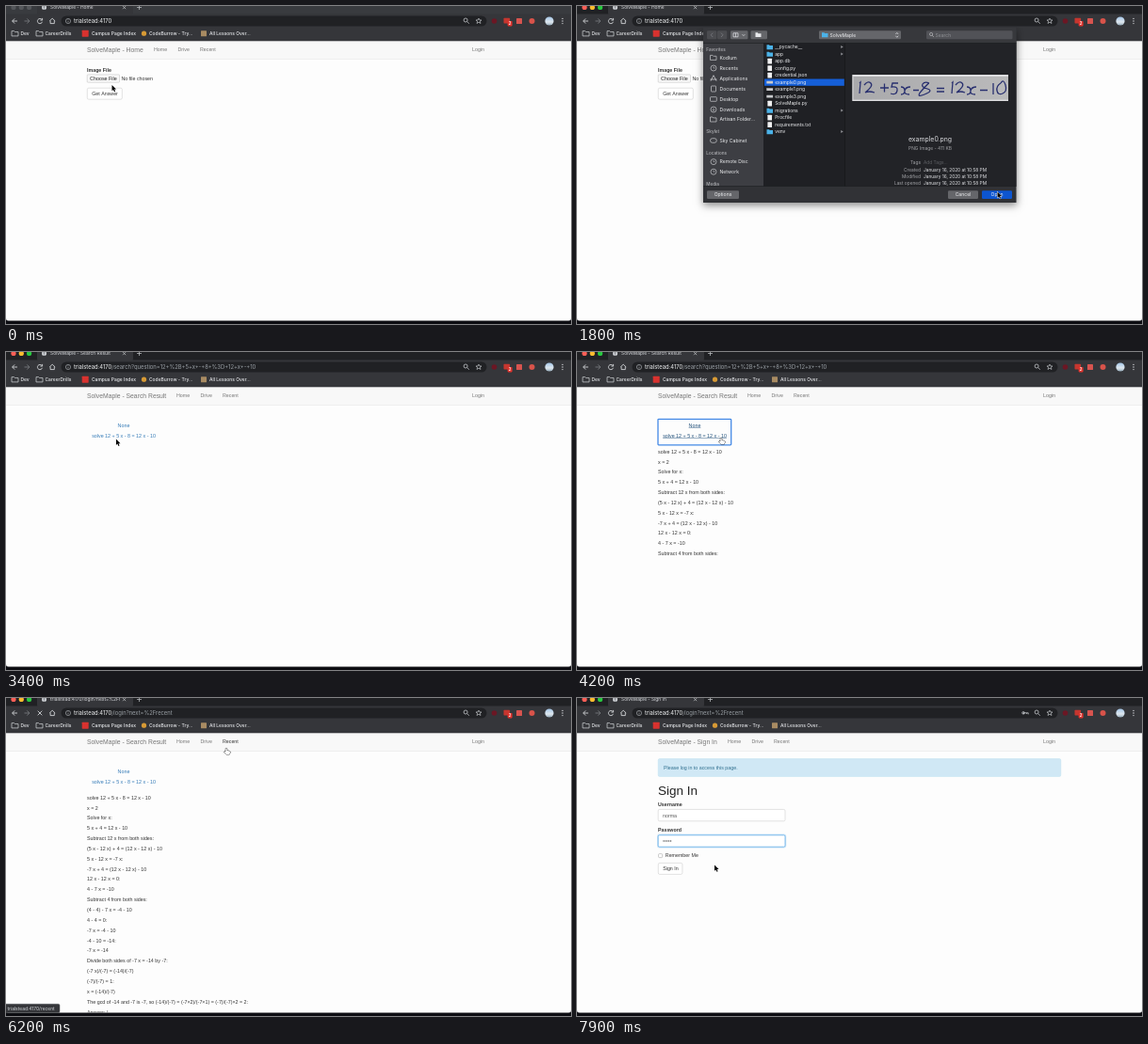
Animation, 600 px wide and 338 px high, one loop 8000 ms. Source, as an HTML page with a canvas:

```html
<!DOCTYPE html>
<html lang="en">
<head>
<meta charset="utf-8">
<title>Equation solver demo</title>
<style>
html, body { margin: 0; width: 100%; height: 100%; overflow: hidden; background: #fff; }
canvas { display: block; width: 600px; height: 338px; }
</style>
</head>
<body>
<canvas id="stage"></canvas>
<script>
const LOOP = 8000, STEP = 100;
const UI = 'Inter, "Open Sans", sans-serif';
const PAGE = '"Liberation Sans", Arial, sans-serif';
const APP = 'SolveMaple', HOST = 'trialstead:4170';
const BODY = 5.3;
const canvas = document.getElementById('stage');
const ctx = canvas.getContext('2d');
const dpr = window.devicePixelRatio || 1;
canvas.width = 600 * dpr;
canvas.height = 338 * dpr;

const clamp = v => Math.max(0, Math.min(1, v));
const smooth = v => { v = clamp(v); return v * v * (3 - 2 * v); };
const ramp = (t, a, b) => smooth((t - a) / (b - a));

// ---- drawing helpers ----
function rect(x, y, w, h, fill) {
  ctx.fillStyle = fill;
  ctx.fillRect(x, y, w, h);
}

function box(x, y, w, h, r, fill, line, width = 0.5) {
  ctx.beginPath();
  ctx.roundRect(x, y, w, h, r);
  if (fill) { ctx.fillStyle = fill; ctx.fill(); }
  if (line) { ctx.strokeStyle = line; ctx.lineWidth = width; ctx.stroke(); }
}

function dot(x, y, r, fill) {
  ctx.beginPath();
  ctx.arc(x, y, r, 0, Math.PI * 2);
  ctx.fillStyle = fill;
  ctx.fill();
}

function stroke(d, color, width = 0.8) {
  ctx.strokeStyle = color;
  ctx.lineWidth = width;
  ctx.stroke(new Path2D(d));
}

// Text with its visual middle at y; returns the width.
function text(s, x, y, size, color, font = UI, weight = 400, align = 'left') {
  ctx.font = `${weight} ${size}px ${font}`;
  ctx.textAlign = align;
  ctx.fillStyle = color;
  ctx.fillText(s, x, y + size * 0.35);
  return ctx.measureText(s).width;
}

const page = (s, x, y, color = '#333', size = BODY, weight = 400, align = 'left') =>
  text(s, x, y, size, color, PAGE, weight, align);

function clipped(x, y, w, h, draw) {
  ctx.save();
  ctx.beginPath();
  ctx.rect(x, y, w, h);
  ctx.clip();
  draw();
  ctx.restore();
}

function folder(x, y, w, h, color, fill) {
  const d = `M${x} ${y}h${w * 0.38}l${w * 0.12} ${h * 0.18}h${w * 0.5}v${h * 0.82}h${-w}z`;
  if (fill) { ctx.fillStyle = color; ctx.fill(new Path2D(d)); }
  else stroke(d, color, 0.7);
}

// ---- timeline ----
const PATH = [
  [0, 112.5, 84], [300, 112.5, 84], [1000, 226, 79], [1200, 226, 79], [1700, 446.5, 197.5],
  [1900, 446.5, 197.5], [2400, 135.5, 109], [2750, 108, 93], [3200, 108, 93],
  [3900, 153, 91], [4200, 153, 91], [4700, 178, 157], [5400, 178, 157],
  [6000, 234, 53], [6500, 234, 53], [6900, 146, 125], [7000, 146, 125], [7900, 146, 177.5]
];

function mouseAt(t) {
  for (let i = 1; i < PATH.length; i++) {
    const [a, ax, ay] = PATH[i - 1], [b, bx, by] = PATH[i];
    if (t <= b) {
      const p = ramp(t, a, b);
      return [ax + (bx - ax) * p, ay + (by - ay) * p];
    }
  }
  return PATH[PATH.length - 1].slice(1);
}

function stateAt(t) {
  const view = t < 3400 ? 'home' : t < 6600 ? 'result' : 'login';
  const title = { home: 'Home', result: 'Search Result', login: 'Sign In' }[view];
  const wait = (t >= 3000 && t < 3400) || (t >= 6100 && t < 6600);
  let path = '';
  if (t >= 3000) path = '/search?question=12+%2B+5+x+-+8+%3D+12+x+-+10';
  if (t >= 6100) path = '/login?next=%2Frecent';
  return {
    t, view, title, wait, path,
    sheet: t < 1000 ? clamp(t / 200) : clamp((2000 - t) / 200),
    scroll: 17 * (ramp(t, 4800, 5100) - ramp(t, 5400, 5800)),
    mouse: mouseAt(t),
    hand: (t >= 3800 && t < 4400) || (t >= 5900 && t < 6600),
    hidden: t >= 7000 && t < 7900
  };
}

// CSS "ease" curve
function ease(p) {
  let lo = 0, hi = 1, u = 0.5;
  for (let i = 0; i < 20; i++) {
    u = (lo + hi) / 2;
    const x = 0.75 * u * (1 - u) * (1 - u) + 0.75 * u * u * (1 - u) + u * u * u;
    if (x < p) lo = u; else hi = u;
  }
  return 0.3 * u * (1 - u) * (1 - u) + 3 * u * u * (1 - u) + u * u * u;
}

// ---- browser window ----
function bookmark(s, x, y = 29.2) { text(s, x, y, 4.95, '#e8eaed', UI, 500); }

function browser(s) {
  const idle = s.t < 100;
  rect(0, 0, 600, 9, idle ? '#393b3f' : '#202124');
  rect(0, 8.5, 600, 28.8, '#35363a');
  box(33, -6, 102, 16, 3, '#35363a');
  ['#ff5f57', '#febc2e', '#28c840'].forEach((c, i) =>
    dot(8 + i * 8.3, 1.5, 2.6, idle ? '#55575b' : c));

  dot(40.5, 1.5, 2.5, '#d5d8dc');
  stroke('M38.3 1h4M40.5 -1v5', '#6a6d72', 0.5);
  clipped(46, 0, 75, 9, () =>
    text(s.wait ? HOST + s.path : `${APP} - ${s.title}`, 47, 1.4, 4.9, '#d8dade'));
  stroke('M124 0l3.2 3.2M127.2 0l-3.2 3.2M139 1.5h5M141.5 -1v5', '#c4c7cb', 0.7);

  stroke('M12 16h-5.2M9.2 13.4l-2.6 2.6l2.6 2.6', '#e4e6e9');
  stroke('M19.5 16h5.2M22.3 13.4l2.6 2.6l-2.6 2.6', '#7c7f83');
  if (s.wait) stroke('M33.7 13.7l4.6 4.6M38.3 13.7l-4.6 4.6', '#e4e6e9');
  else stroke('M38 14.4a2.6 2.6 0 1 0 .5 2.4M38.6 12.9v2.2h-2.2', '#e4e6e9');
  stroke('M46.2 16l3-2.8l3 2.8M47.1 15.6v3h4.2v-3', '#e4e6e9');

  box(58.5, 10.4, 452, 11.2, 5.6, '#202124');
  ctx.beginPath();
  ctx.arc(66, 16, 2.6, 0, 7);
  ctx.strokeStyle = '#b7babf';
  ctx.lineWidth = 0.6;
  ctx.stroke();
  stroke('M66 15.7v1.7M66 14.4v.6', '#b7babf', 0.6);
  const w = text(HOST, 72, 15.9, 5.85, '#f1f3f4');
  if (s.path) text(s.path, 72 + w, 15.9, 5.85, '#9aa0a6');

  if (s.view === 'login') {
    stroke('M475 15.8h4.2v1.6M477.6 16v1', '#c4c7cb', 0.8);
    dot(474, 15.8, 1.6, '#c4c7cb');
    dot(473.7, 15.8, 0.6, '#202124');
  }
  stroke('M490.1 15a2 2 0 1 0 -4 0a2 2 0 1 0 4 0M489.6 16.5l2.2 2.2', '#c4c7cb', 0.8);
  stroke('M502 13l.9 2h2.1l-1.7 1.3l.7 2.2l-2-1.3l-2 1.3l.7-2.2l-1.7-1.3h2.1z', '#d5d8dc', 0.6);

  dot(518.5, 16, 2.8, '#6b1724');
  box(528.5, 12.8, 6.6, 5.6, 0.6, '#c5362f');
  box(532.6, 16, 5, 5.4, 0.8, '#e0332d');
  text('2', 535.1, 18.7, 4.2, '#fff', UI, 600, 'center');
  box(542, 13, 6, 6, 0.6, '#d8544f');
  dot(558.5, 16, 3, '#d9534a');
  const sky = ctx.createLinearGradient(0, 11, 0, 21);
  sky.addColorStop(0, '#9fc3e6');
  sky.addColorStop(0.6, '#dfe8ef');
  sky.addColorStop(1, '#8ca3b4');
  dot(577, 16, 4.6, sky);
  for (const y of [13.4, 16, 18.6]) dot(591, y, 0.65, '#e4e6e9');

  folder(6, 26.6, 7, 5.3, '#d5d8dc');
  bookmark('Dev', 15.5);
  folder(32, 26.6, 7, 5.3, '#d5d8dc');
  bookmark('CareerDrills', 41.5);
  box(80.7, 25.7, 7, 7, 0.6, '#d8322f');
  bookmark('Campus Page Index', 91);
  dot(146.5, 29.2, 2.6, '#d79a35');
  bookmark('CodeBurrow - Try...', 152);
  box(207, 26.2, 6, 6, 0.5, '#a88b62');
  bookmark('All Lessons Over...', 216);
}

// ---- pages ----
function navbar(s) {
  rect(0, 37.3, 600, 19, '#f8f8f8');
  rect(0, 56, 600, 0.5, '#e1e1e1');
  const x = { home: 157, result: 181, login: 160 }[s.view];
  page(`${APP} - ${s.title}`, 86, 46.7, '#777', 6.8);
  page('Home', x, 46.6, '#777');
  page('Drive', x + 25.5, 46.6, '#777');
  page('Recent', x + 49, 46.6, s.t >= 5900 && s.t < 6600 ? '#333' : '#777');
  page('Login', 495, 46.6, '#777');
}

const button = (s, x, y, w) => {
  box(x, y, w, 12, 1.5, '#fff', '#c4c4c4');
  page(s, x + 4.9, y + 6, '#333');
};

function home(s) {
  const chosen = s.t >= 2000;
  page('Image File', 86, 68, '#333', BODY, 700);
  box(86.2, 72.9, 34.3, 8.3, 0.8, '#f8f8f8', '#bdbdbd');
  page('Choose File', 89, 77, '#222', 5.4);
  page(chosen ? 'example0.png' : 'No file chosen', 122.4, 77, '#333');
  if (chosen) box(86.1, 72.4, 35.6, 9.4, 0.4, null, '#4f97e0', 0.9);
  button('Get Answer', 86.3, 87.2, 37);
}

const EQUATION = 'solve 12 + 5 x - 8 = 12 x - 10';
const LINES = [
  EQUATION, 'x = 2', 'Solve for x:', '5 x + 4 = 12 x - 10', 'Subtract 12 x from both sides:',
  '(5 x - 12 x) + 4 = (12 x - 12 x) - 10', '5 x - 12 x = -7 x:', '-7 x + 4 = (12 x - 12 x) - 10',
  '12 x - 12 x = 0:', '4 - 7 x = -10', 'Subtract 4 from both sides:', '(4 - 4) - 7 x = -4 - 10',
  '4 - 4 = 0:', '-7 x = -4 - 10', '-4 - 10 = -14:', '-7 x = -14',
  'Divide both sides of -7 x = -14 by -7:', '(-7 x)/(-7) = (-14)/(-7)', '(-7)/(-7) = 1:',
  'x = (-14)/(-7)', 'The gcd of -14 and -7 is -7, so (-14)/(-7) = (-7×2)/(-7×1) = (-7)/(-7)×2 = 2:',
  'Answer: |', '| x = 2'
];

function result(s) {
  const focus = s.t >= 4100 && s.t < 6000;
  const lit = focus || (s.t >= 3800 && s.t < 4100);
  const color = lit ? '#23527c' : '#337ab7';
  [['None', 77.8], [EQUATION, 88.7]].forEach(([line, y]) => {
    const w = page(line, 125, y, color, 5.35, 400, 'center');
    if (lit) rect(125 - w / 2, y + 2.5, w, 0.45, color);
  });
  if (focus) box(86, 71.3, 77.7, 27.6, 0.8, null, '#4389e6', 1.3);
  const open = ease(clamp((s.t - 4100) / 350));
  clipped(80, 99.7, 440, 252 * open, () =>
    LINES.forEach((line, i) => page(line, 86, 105.8 + i * 10.85, '#333', 5.35)));
}

function field(y, focus) {
  if (focus) box(86.2, y, 134.8, 12.4, 1.5, null, 'rgba(102,175,233,.35)', 2.4);
  box(86.2, y, 134.8, 12.4, 1.5, '#fff', focus ? '#66afe9' : '#c4c4c4', focus ? 0.8 : 0.5);
}

function login(s) {
  const name = Math.floor(clamp((s.t - 6900) / 500) * 5);
  const pass = s.t >= 7900 ? 5 : s.t >= 7700 ? 4 : s.t >= 7600 ? 2 : 0;
  box(86.2, 64.6, 427.6, 18.8, 1.5, '#d0e8f5', '#bce0ee');
  page('Please log in to access this page.', 92, 73.8, '#31708f');
  page('Sign In', 86, 98.5, '#222', 13.5);
  page('Username', 86, 113, '#333', BODY, 700);
  field(118.4, s.t >= 6800 && s.t < 7500);
  page('norma'.slice(0, name), 91, 124.8, '#555');
  page('Password', 86, 140, '#333', BODY, 700);
  field(145.8, s.t >= 7500);
  for (let i = 0; i < pass; i++) dot(92 + i * 1.9, 152, 0.65, '#444');
  box(86.6, 165.6, 4, 4, 0.8, '#fff', '#999');
  page('Remember Me', 93.8, 167.6);
  button('Sign In', 86.3, 175.4, 25.6);
}

// ---- file chooser ----
const FILES = [
  '__pycache__/', 'app/', 'app.db', 'config.py', 'credential.json', 'example0.png', 'example1.png',
  'example3.png', APP + '.py', 'migrations/', 'Procfile', 'requirements.txt', 'venv/'
];
const SIDE = [
  ['Favorites', 46, 1], ['Kodlum', 55], ['Recents', 66], ['Applications', 77], ['Documents', 88],
  ['Desktop', 99], ['Downloads', 110], ['Artisan Folder...', 120.6], ['Skylet', 133.3, 1],
  ['Sky Cabinet', 143], ['Locations', 156, 1], ['Remote Disc', 165.6], ['Network', 176.2], ['Media', 189.3, 1]
];
const INK = [
  'M300 82l1-1l-1 12', 'M305 84q4-5 7-2t-6 10q4-2 10 0', 'M322 87h9M326.5 82.5v9',
  'M341 82h-6l-1 4q7-1 6 4t-7 3', 'M344 86q4 0 4 4t-4 4M354 86q-5 0-6 4t5 4', 'M357 89.5h6',
  'M374 82q-5-2-7 1t5 5t-3 6t-3-4t8-8', 'M382 87.5h8M382 91h8', 'M398 82l1-1l-1 12',
  'M402 84q4-5 7-2t-6 10q4-2 9 0', 'M414 86q4 0 4 4t-4 4M424 86q-5 0-6 4t5 4',
  'M428 89.5h8', 'M442 82v12', 'M450 82q-5 3-4 8t6 3t3-9t-5-2'
];

function sideIcon(i, y) {
  const c = '#c9cacd';
  if (i === 1 || i === 7) folder(141.5, y - 2.6, 6.5, 5, c);
  else if (i === 3) stroke(`M142 ${y + 2.7}l3-6l3 6M141.5 ${y + 1}h7`, c, 0.8);
  else if (i === 4) box(142.5, y - 3, 5, 6, 0.5, null, c, 0.7);
  else if (i === 5 || i === 9) box(141.5, y - 2.3, 6.8, 4.6, i === 9 ? 2.3 : 0.6, null, c, 0.7);
  else {
    box(142, y - 3, 6, 6, 3, null, c, 0.7);
    stroke(i === 6 ? `M145 ${y - 1.6}v3l-1.2-1.2M145 ${y + 1.4}l1.2-1.2` : `M145 ${y - 1.6}v1.6h1.4`, c, 0.6);
  }
}

function preview() {
  const g = ctx.createLinearGradient(292, 0, 458, 0);
  g.addColorStop(0, '#a9a9ab');
  g.addColorStop(1, '#bababb');
  rect(292.3, 73, 165.7, 28, '#dedee0');
  rect(293.5, 75, 164.5, 24.6, g);
  INK.forEach(d => stroke(d, '#29306f', 1.3));
  text('example0.png', 375, 142, 6.9, '#dcdde0', UI, 400, 'center');
  text('PNG Image - 411 KB', 375, 151, 4.9, '#a3a4a8', UI, 400, 'center');
  const when = 'January 16, 2020 at 10:58 PM';
  [['Tags', 'Add Tags...'], ['Created', when], ['Modified', when], ['Last opened', when]].forEach(([k, v], i) => {
    const y = i ? 166.8 + i * 7.3 : 166.2;
    text(k, 365, y, 4.8, '#a3a4a8', UI, 400, 'right');
    text(v, 368, y, 4.8, i ? '#e4e5e8' : '#5e6064');
  });
}

function sheet(s) {
  const picked = s.t >= 1000;
  ctx.save();
  ctx.shadowColor = 'rgba(0,0,0,.45)';
  ctx.shadowBlur = 8 * dpr;
  ctx.shadowOffsetY = 3 * dpr;
  rect(134, 22.8, 332.5, 186.2, '#313236');
  ctx.restore();
  rect(134, 22.8, 332.5, 16.7, '#37383c');
  rect(134, 39.5, 64, 152, '#3d3e43');
  rect(198, 39.5, 86, 152, '#1f2024');
  rect(284, 39.5, 182.5, 152, '#222327');
  rect(284, 39.5, 0.5, 152, '#0f1012');
  rect(134, 39.3, 332.5, 0.5, '#17181a');
  rect(134, 191.3, 332.5, 0.5, '#17181a');

  box(138, 26.3, 10.3, 9, 1.3, '#4b4c50');
  box(149, 26.3, 10.3, 9, 1.3, '#4b4c50');
  stroke('M144.2 28.6l-2 2.2l2 2.2M153 28.6l2 2.2l-2 2.2', '#828388', 0.7);
  box(163, 26.3, 18.5, 9, 1.3, '#65666a');
  stroke('M166 28.8v4M168.5 28.8v4M171 28.8v4M166 28.8h5M166 32.8h5M175.5 30.2l1.4 1.4l1.4-1.4', '#e8e9ec', 0.7);
  box(184.5, 26.3, 17.5, 9, 1.3, '#65666a');
  folder(189.5, 28.3, 6, 4.6, '#e8e9ec', true);
  box(257, 26.3, 87, 9, 1.3, '#65666a');
  folder(260, 28.2, 6.5, 5, '#4bb2e8', true);
  text(APP, 268.5, 30.8, 5, '#f0f1f3');
  stroke('M338.4 30l1.4-1.6l1.4 1.6M338.4 31.7l1.4 1.6l1.4-1.6', '#e8e9ec', 0.7);
  box(371, 26.3, 91.5, 9, 1.3, '#515257');
  stroke('M377.7 30a1.6 1.6 0 1 0 -3.2 0a1.6 1.6 0 1 0 3.2 0M377.2 31.2l1.7 1.8', '#c9cacd', 0.6);
  text('Search', 380.5, 30.8, 5, '#919297');

  clipped(134, 39.5, 64, 151.8, () => SIDE.forEach(([label, y, head], i) => {
    if (head) text(label, 137.3, y, 4.6, '#a5a6aa', UI, 600);
    else {
      sideIcon(i, y);
      text(label, 151.5, y, 5.1, '#eeeff1');
    }
  }));

  FILES.forEach((name, i) => {
    const y = 43.6 + i * 7.5, dir = name.endsWith('/');
    if (picked && i === 5) rect(199, y - 3.6, 84.8, 7.3, '#155fd8');
    if (dir) {
      folder(201.5, y - 2.4, 6.5, 5, '#4bb2e8', true);
      ctx.fillStyle = '#95969b';
      ctx.fill(new Path2D(`M280.3 ${y - 1.5}l2.4 1.5l-2.4 1.5z`));
    } else if (name.endsWith('.png')) box(201.3, y - 1.3, 6.8, 2.6, 0.2, '#c8c9cc');
    else box(202.4, y - 2.9, 4.6, 5.9, 0.5, '#f0f0f1');
    text(name.replace('/', ''), 210.2, y, 4.95, '#f0f1f3');
  });
  if (picked) preview();

  const push = (label, x, w, fill) => {
    box(x, 196.2, w, 8.8, 1.3, fill);
    text(label, x + w / 2, 200.6, 5.1, '#f2f3f5', UI, 400, 'center');
  };
  push('Options', 138, 34, '#65666a');
  push('Cancel', 394, 32, '#65666a');
  push('Open', 430, 32, !picked ? '#48494d' : s.t >= 1800 ? '#0d55d0' : '#1765e0');
}

// ---- pointer ----
function pointer(s) {
  if (s.hidden) return;
  ctx.save();
  ctx.translate(...s.mouse);
  ctx.lineJoin = 'round';
  const shape = new Path2D(s.hand
    ? 'M-.7 .6q.7-.9 1.4 0v2.3l2.9 .6q.6 .2 .5 1l-.7 2.4h-3.6l-2.2-2.7q0-1 1.7 0z'
    : 'M0 0v6.3l1.5-1.3l1 2.3l1.1-.5l-1-2.2h2z');
  ctx.strokeStyle = s.hand ? '#111' : '#fff';
  ctx.lineWidth = s.hand ? 0.9 : 1;
  ctx.stroke(shape);
  ctx.fillStyle = s.hand ? '#fff' : '#000';
  ctx.fill(shape);
  ctx.restore();
}

const VIEWS = { home, result, login };

function draw(t) {
  const s = stateAt(t);
  ctx.setTransform(dpr, 0, 0, dpr, 0, 0);
  rect(0, 0, 600, 338, '#0c0c11');
  box(0, 20, 600, 314.5, 2.5, '#fdfdfd');
  clipped(0, 37.3, 600, 296.9, () => {
    ctx.translate(0, -s.scroll);
    navbar(s);
    VIEWS[s.view](s);
  });
  if (t >= 5900 && t < 6600) {
    box(-2, 325.3, 59, 9.2, 1.5, '#35363a', '#54565a');
    text(HOST + '/recent', 1.5, 330, 4.9, '#d5d8dc');
  }
  browser(s);
  if (s.sheet > 0) clipped(0, 22.8, 600, 311, () => {
    ctx.translate(0, (s.sheet - 1) * 187);
    sheet(s);
  });
  pointer(s);
}

const start = performance.now();
function frame() {
  const t = (performance.now() - start) % LOOP;
  draw(Math.floor(t / STEP) * STEP);
  requestAnimationFrame(frame);
}
frame();
</script>
</body>
</html>
```
